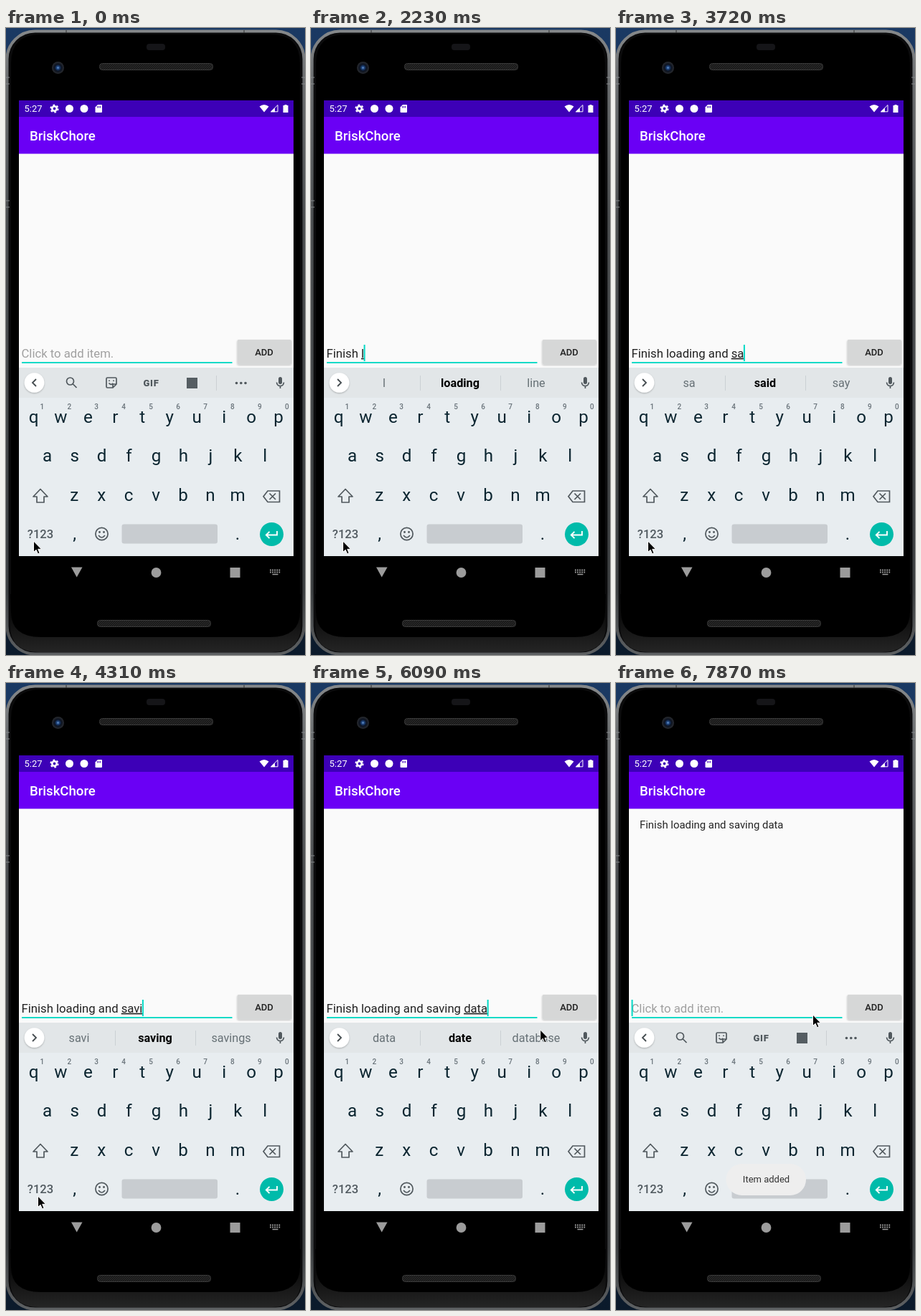
Animation, 417 px wide and 875 px high, one loop 8000 ms. Source, as an HTML page:

```html
<!DOCTYPE html>
<html lang="en">
<head>
<meta charset="utf-8">
<title>To-do list demo</title>
<style>
  html, body { margin: 0; width: 100%; height: 100%; overflow: hidden; background: #000; }
  svg { display: block; width: 417px; height: 875px; font-family: Roboto, "Noto Sans", sans-serif; }
  text { white-space: pre; }
  .mid { text-anchor: middle; }
  .line { fill: none; stroke: #50585d; stroke-width: 1.7; }
</style>
</head>
<body>
<svg viewBox="0 0 417 875">
  <defs>
    <linearGradient id="desk" x1="0" x2="0" y1="0" y2="1">
      <stop offset="0" stop-color="#1a3963"/><stop offset="1" stop-color="#0b1a2b"/>
    </linearGradient>
    <linearGradient id="rim" x1="0" x2="0" y1="0" y2="1">
      <stop offset="0" stop-color="#85888a"/><stop offset=".08" stop-color="#6a6d6f"/>
      <stop offset=".3" stop-color="#4b4e50"/><stop offset=".9" stop-color="#3c3f41"/>
      <stop offset="1" stop-color="#5d6062"/>
    </linearGradient>
    <linearGradient id="chin" x1="0" x2="0" y1="0" y2="1">
      <stop offset="0" stop-color="#000"/><stop offset=".4" stop-color="#0c0c0c"/><stop offset="1" stop-color="#252525"/>
    </linearGradient>
    <pattern id="mesh" width="3" height="3" patternUnits="userSpaceOnUse">
      <rect width="3" height="3" fill="#181818"/><path d="M0 3L3 0" stroke="#363636" stroke-width=".8"/>
    </pattern>
    <radialGradient id="lens">
      <stop offset="0" stop-color="#6b9bd2"/><stop offset=".25" stop-color="#1d427a"/>
      <stop offset=".55" stop-color="#0b1220"/><stop offset="1" stop-color="#2b2d31"/>
    </radialGradient>
    <filter id="soft" x="-20%" y="-20%" width="140%" height="150%">
      <feDropShadow dx="0" dy="1" stdDeviation=".9" flood-opacity=".28"/>
    </filter>
  </defs>

  <!-- phone body -->
  <rect width="417" height="875" fill="url(#desk)"/>
  <rect x="1.500" y="4.500" width="414" height="869" rx="39" fill="#0b0b0c" stroke="url(#rim)" stroke-width="4"/>
  <path d="M6 790H411V834Q411 871 370 871H47Q6 871 6 834Z" fill="url(#chin)"/>
  <path d="M7 50Q7 9 48 9H369Q410 9 410 50V815Q410 850 368 850H49Q7 850 7 815Z" fill="#000"/>
  <path d="M0 69H5M0 78H5M0 241H5M0 250H5M412 69H417M412 78H417" stroke="#85888a"/>
  <path d="M84 3V7M332 3V7" stroke="#333"/>
  <rect x="196" y="22" width="26" height="9" rx="4" fill="#151518"/>
  <circle cx="72.500" cy="55.500" r="8.500" fill="url(#lens)"/>
  <g fill="url(#mesh)" stroke="#3b3b3b">
    <rect x="130.500" y="49.500" width="158" height="9" rx="4"/>
    <rect x="127.500" y="826.500" width="158" height="9" rx="4"/>
  </g>

  <!-- app -->
  <rect x="18" y="101" width="383" height="636" fill="#fafafa"/>
  <rect x="18" y="101" width="383" height="23" fill="#3d00b7"/>
  <rect x="18" y="124" width="383" height="51.500" fill="#6a00f5"/>
  <g fill="#fff">
    <text x="25.500" y="117" font-size="13">5:27</text>
    <circle cx="67.500" cy="112.500" r="3.200" fill="none" stroke="#fff" stroke-width="2.600"/>
    <circle cx="67.500" cy="112.500" r="5.200" fill="none" stroke="#fff" stroke-width="1.800" stroke-dasharray="2.700 2.745"/>
    <circle cx="88.500" cy="112.500" r="5.500"/>
    <circle cx="109" cy="112.500" r="5.500"/>
    <path d="M128 107H133Q134 107 134 108V117Q134 118 133 118H125.500Q124.500 118 124.500 117V110.500Z"/>
    <path d="M127.500 109V111.500M129.500 109V111.500M131.500 109V111.500" stroke="#3d00b7"/>
    <path d="M353.500 109.500Q360 104.500 366.500 109.500L360 117.500Z"/>
    <path d="M369.500 116.800H379V107.500Z" fill="none" stroke="#fff"/>
    <path d="M369 117.300H375V111.500Z"/>
    <path d="M388.500 107H391.500V108H393.500V118H386.500V108H388.500Z"/>
    <text x="33" y="156.500" font-size="18.600" font-weight="500">BriskChore</text>
  </g>
  <text id="item" x="33" y="203" font-size="14.900" fill="#252525">Finish loading and saving data</text>

  <rect id="button" x="322.500" y="435" width="75.500" height="34.500" rx="2" filter="url(#soft)"/>
  <text class="mid" x="360" y="457" font-size="13" font-weight="500" fill="#202020">ADD</text>
  <text id="hint" x="21.500" y="459.700" font-size="16.700" fill="#a0a0a0">Click to add item.</text>
  <text id="entry" x="21.500" y="459.700" font-size="16.700" fill="#212121"><tspan id="done"></tspan><tspan id="word" text-decoration="underline"></tspan></text>
  <rect id="caret" y="442" width="2" height="23" fill="#03d9c5"/>
  <rect x="22" y="466" width="293.500" height="1.900" fill="#03d9c5"/>

  <!-- keyboard -->
  <rect x="18" y="474" width="383" height="263" fill="#e8edf0"/>
  <rect x="18" y="474" width="383" height="42" fill="#e2e6e8"/>
  <circle cx="39.500" cy="495" r="13.800" fill="#fff" filter="url(#soft)"/>
  <path id="chevron" fill="none" stroke="#454c50" stroke-width="1.800"/>
  <g id="tools">
    <circle class="line" cx="89.500" cy="493" r="5"/><path class="line" d="M93 496.500L98.500 502" stroke-width="2"/>
    <path class="line" d="M141.500 488H152.500Q154 488 154 489.500V497L149 502H141.500Q140 502 140 500.500V489.500Q140 488 141.500 488ZM154 497H149V502"/>
    <path class="line" d="M143.500 495.500Q146 499 149.500 496M144 491.500V493M150 491.500V493" stroke-width="1.500"/>
    <text class="mid" x="202.500" y="499.500" font-size="13" font-weight="900" fill="#50585d" letter-spacing=".7">GIF</text>
    <rect x="252" y="488" width="15" height="15" fill="#555d62"/>
    <path d="M293.500 485V506" stroke="#cbd0d3"/>
    <g fill="#50585d"><circle cx="321.500" cy="495.500" r="1.800"/><circle cx="327.800" cy="495.500" r="1.800"/><circle cx="334" cy="495.500" r="1.800"/></g>
  </g>
  <g id="strip" class="mid" font-size="16.200" fill="#667075">
    <path d="M152.500 485V506M264.500 485V506" stroke="#cbd0d3"/>
    <text class="guess" x="102" y="501"></text>
    <text class="guess" x="208" y="501" font-weight="700" fill="#000"></text>
    <text class="guess" x="314" y="501"></text>
  </g>
  <rect x="380" y="487" width="5" height="10" rx="2.500" fill="#50585d"/>
  <path class="line" d="M377.500 494.500Q378 499.500 382.500 499.500T387.500 494.500M382.500 499.500V503" stroke-width="1.500"/>

  <g id="keys" class="mid"></g>
  <path class="line" d="M48 643.500L58 654H53V662H43V654H38Z" stroke-linejoin="round"/>
  <path class="line" d="M365 646H381.500V661.500H365L359 653.800ZM367.500 649.500L376 658M376 649.500L367.500 658"/>
  <text class="mid" x="48" y="712" font-size="16.600" font-weight="500" fill="#525b61">?123</text>
  <circle class="line" cx="133.500" cy="706" r="8.600"/>
  <path class="line" d="M129 708Q133.500 714 138 708" stroke-width="1.500"/>
  <circle cx="130.500" cy="703.500" r="1.400" fill="#50585d"/><circle cx="136.500" cy="703.500" r="1.400" fill="#50585d"/>
  <rect x="161.500" y="692.500" width="133.500" height="27" rx="3" fill="#c8ccd0"/>
  <circle cx="370.500" cy="706.500" r="16.500" fill="#00bbaa"/>
  <path d="M378 702V707.500H363M367.500 702.800L362.800 707.500L367.500 712.200" fill="none" stroke="#fff" stroke-width="1.900"/>

  <g id="toast">
    <rect x="153.500" y="671" width="111.500" height="44" rx="22" fill="#eeeeee"/>
    <text class="mid" x="209.500" y="697" font-size="13" fill="#333">Item added</text>
  </g>

  <!-- navigation -->
  <g fill="#9c9c9c">
    <path d="M91 752.500H106.500L98.700 766.500Z"/>
    <circle cx="209.500" cy="760" r="6.900"/>
    <rect x="312.500" y="753" width="14" height="14"/>
    <path d="M368 756.500H383M368 759.500H383" stroke="#9c9c9c" stroke-width="1.800" stroke-dasharray="1.800 1.300"/>
    <path d="M371.500 762.500H379.500" stroke="#9c9c9c" stroke-width="1.500"/>
  </g>

  <path id="mouse" d="M0 0V15.500L3.600 12.200L6 17.800L8.500 16.700L6.200 11.300H11Z" fill="#000" stroke="#fff"/>
</svg>

<script>
const LOOP = 8000, TICK = 148.5;
const $ = id => document.getElementById(id);
const show = (id, on) => $(id).setAttribute("visibility", on ? "visible" : "hidden");

// [tick, typed text, suggestions]
const typing = [
  [0, "", ""],
  [8, "F", "F For From"],
  [9, "Fi", "Fi First Fire"],
  [10, "Fin", "Fin Finish Find"],
  [11, "Fini", "Fini Finish Finished"],
  [12, "Finis", "Finis Finish Finished"],
  [13, "Finish", "Finishing Finish Finished"],
  [14, "Finish ", "the it up"],
  [15, "Finish l", "l loading line"],
  [16, "Finish lo", "lo loading long"],
  [17, "Finish loa", "loa loading load"],
  [18, "Finish load", "load loading loaded"],
  [19, "Finish loadin", "loadin loading loadings"],
  [20, "Finish loading", "loading loadings leading"],
  [21, "Finish loading ", "and the screen"],
  [22, "Finish loading a", "a and at"],
  [23, "Finish loading and", "and end another"],
  [24, "Finish loading and ", "please the then"],
  [25, "Finish loading and sa", "sa said say"],
  [27, "Finish loading and sav", "sav save savings"],
  [29, "Finish loading and savi", "savi saving savings"],
  [30, "Finish loading and saving", "saving savings having"],
  [31, "Finish loading and saving ", "the money it"],
  [32, "Finish loading and saving d", "d data do"],
  [33, "Finish loading and saving dat", "dat data date"],
  [34, "Finish loading and saving data", "data date database"],
  [44, "", ""]
];

// [tick, x, y] of the pointer tip
const path = [
  [0, 38.5, 716], [2, 44.5, 716], [35, 44.5, 716], [37, 92, 676], [40, 281, 516],
  [42, 358.5, 452], [45, 358.5, 452], [49, 341, 463], [50, 341, 463], [53, 274.5, 463]
];

const caretOff = [[0, 4], [7, 8], [38, 41], [48, 51]];
const toastFade = { 44: .12, 45: .6, 46: .9 };

function addKeys(letters, x, y, size = 24.2) {
  return [...letters].map((c, i) =>
    `<text x="${x + 37.95 * i}" y="${y}" font-size="${size}">${c}</text>`).join("");
}
$("keys").innerHTML =
  `<g fill="#0b2530">${addKeys("qwertyuiop", 38.5, 551)}${addKeys("asdfghjkl", 57.7, 605)}` +
  `${addKeys("zxcvbnm", 95.3, 660)}${addKeys(",", 95.7, 713.5)}${addKeys(".", 323, 713.5)}</g>` +
  `<g fill="#69737a" font-weight="500">${addKeys("1234567890", 50.3, 532, 10)}</g>`;

function pointerAt(tick) {
  let i = 0;
  while (i < path.length - 2 && path[i + 1][0] <= tick) i++;
  const [t0, x0, y0] = path[i], [t1, x1, y1] = path[i + 1];
  const k = Math.min(1, (tick - t0) / (t1 - t0));
  return [x0 + (x1 - x0) * k, y0 + (y1 - y0) * k];
}

function draw(tick) {
  const [, text, guesses] = typing.filter(s => s[0] <= tick).pop();
  const added = tick >= 44;
  const cut = text.lastIndexOf(" ") + 1;
  $("done").textContent = text.slice(0, cut);
  $("word").textContent = text.slice(cut);
  $("caret").setAttribute("x", text ? 21 + $("entry").getComputedTextLength() : 21.5);
  show("caret", !caretOff.some(([a, b]) => tick >= a && tick < b));
  show("hint", !text);
  show("tools", !text);
  show("strip", text);
  $("chevron").setAttribute("d", text ? "M37 490L42 495L37 500" : "M42 490L37 495L42 500");
  const words = guesses.split(" ");
  document.querySelectorAll(".guess").forEach((el, i) => el.textContent = words[i] || "");

  show("item", added);
  $("toast").setAttribute("opacity", added ? toastFade[tick] ?? 1 : 0);
  $("button").setAttribute("fill", tick === 43 ? "#c4c5c5" : tick === 44 ? "#cccdcd" : "#d6d7d7");
  $("mouse").setAttribute("transform", `translate(${pointerAt(tick)})`);
}

let last = -1;
function frame(now) {
  const tick = Math.min(53, Math.floor((now % LOOP + 7) / TICK));
  if (tick !== last) draw(last = tick);
  requestAnimationFrame(frame);
}
draw(0);
requestAnimationFrame(frame);
</script>
</body>
</html>
```
